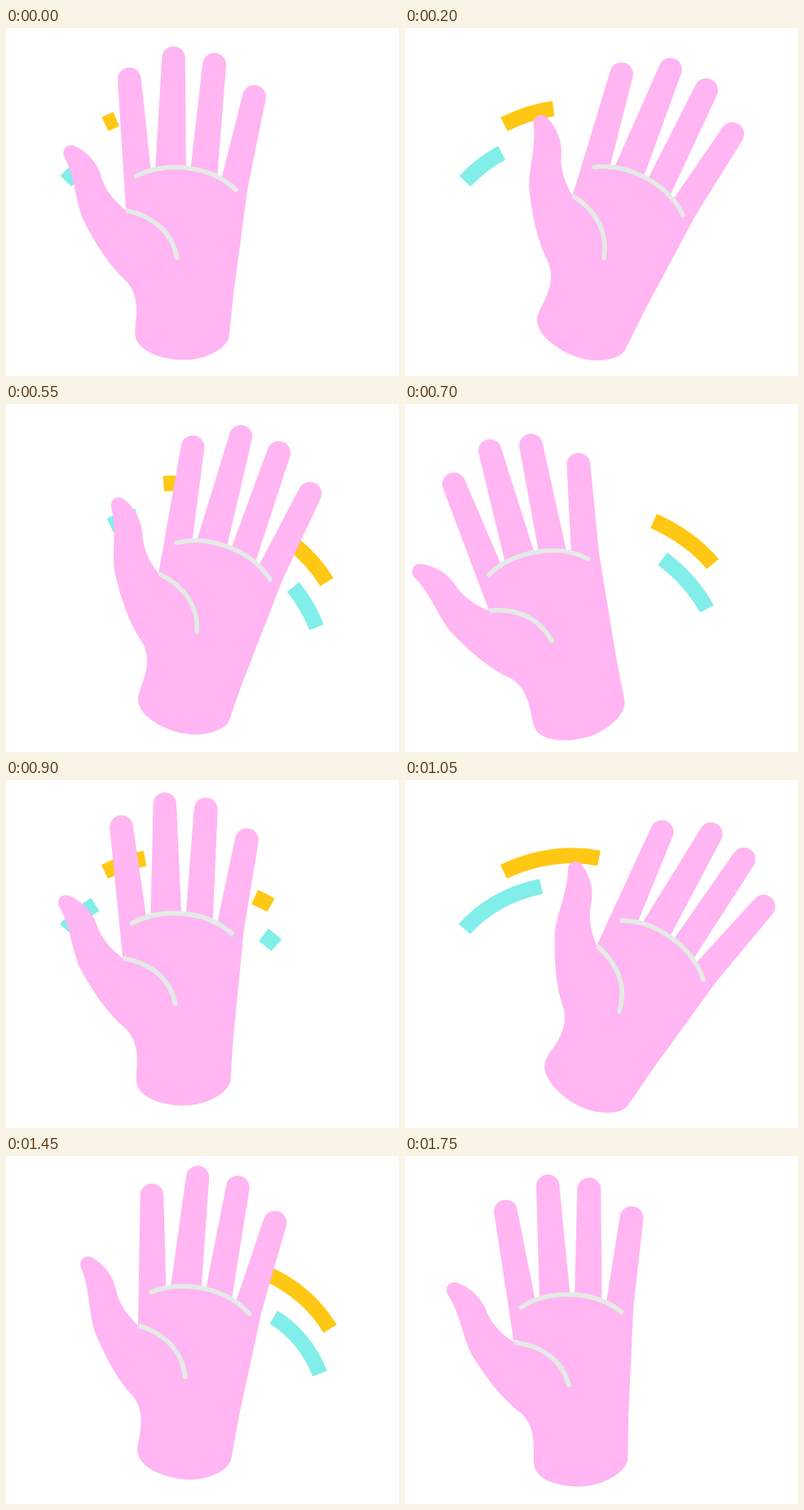
Write an HTML page that moves like this. It is 482 px wide and 427 px high and loops after 1.8 s.

```html
<!DOCTYPE html>
<html lang="en">
<head>
<meta charset="utf-8">
<title>Waving hand</title>
<style>
html, body { margin: 0; width: 100%; height: 100%; overflow: hidden; background: #fff; }
svg { display: block; }
path { fill: none; }
#trails path { stroke-width: 19; }
.crease { stroke: #e4ebe6; stroke-width: 5.6; stroke-linecap: round; }
</style>
</head>
<body>
<svg width="482" height="427" viewBox="0 0 482 427">
  <g id="trails"></g>
  <g id="hand">
    <path style="fill:#ffb6f2" d="M133.5 228.5
      L109.3 70 A14 14 0 0 1 137.7 66 L160.3 180 L165 176
      L161 38 A14 14 0 0 1 189.3 36 L202.5 171 L208 171
      L211.3 41 A14.4 14.4 0 0 1 240.2 41 L241.5 178 L246.8 180
      L263.6 74 A14.2 14.2 0 0 1 292.2 78 L280 187
      L274 320 L273.3 372 C272 386 246 405.5 213 405.5 C183 405.5 158 395 158 376
      C157 360 162 335 143 316 C117 297 97 268 82 244
      C70 220 68 194 52 169 C48 160 56 152 65 156
      C81 162 95 175 101 193 C107 206 117 217.500 133.500 228.500 Z"/>
    <path class="crease" d="M142.500 185.500 C176 164 232 164 265.500 191.500"/>
    <path class="crease" style="stroke-linecap:butt" d="M134 228.500 C170 233 193 252 201 281"/>
    <path class="crease" d="M201 281 l-.3 -1"/>
  </g>
</svg>
<script>
const LOOP = 1800, STEP = 50, PIVOT = '230 384';
const YELLOW = '#ffc814', CYAN = '#82eee9';

// Hand poses: time, angle, shift x, shift y
const poses = [
  [0, 5.1, -.7, 3.1], [200, 25.5, -4.4, 3.6], [400, 38.5, -3, 10],
  [550, 18.7, -1.4, 2.3], [755, -16.5, 0, 1], [900, 3, 1.4, -5.2],
  [1110, 38.5, 0, 4], [1250, 33.1, 0, 0], [1450, 9.6, 1.2, -6.5],
  [1630, -4.3, 0, 0], [1750, 0, 0, 0]
];

// Motion trails: head start and end, tail start and end, then the curves
const sweeps = [
  [-62, 406, 300, 680, 'M121.5 118Q178 90 232 100', 'M73.5 188Q110 149 161 138'],
  [447, 640, 620, 965, 'M393.5 218.5Q364 170 305 143.5', 'M381 274Q360.5 223 316 190'],
  [800, 1030, 1050, 1450, 'M121 112.5Q180 85 238 96', 'M73 183Q108 143 167 130.5'],
  [1160, 1480, 1500, 1740, 'M397.5 212Q368 163 310 140', 'M385 267Q365 217 320 193']
];

const hand = document.getElementById('hand');
const group = document.getElementById('trails');

function addTrail(d, color) {
  const path = document.createElementNS('http://www.w3.org/2000/svg', 'path');
  path.setAttribute('d', d);
  path.setAttribute('pathLength', 1);
  path.setAttribute('stroke', color);
  return group.appendChild(path);
}

const trails = sweeps.map(([a, b, c, d, yellow, cyan]) => ({
  head: [a, b], tail: [c, d],
  paths: [addTrail(yellow, YELLOW), addTrail(cyan, CYAN)]
}));

function key(i) {
  const n = poses.length, turn = Math.floor(i / n);
  const [t, ...values] = poses[i - turn * n];
  return { t: t + turn * LOOP, values };
}

// Slope at a key, flat where the motion turns back
function slope(i, k) {
  const [a, b, c] = [key(i - 1), key(i), key(i + 1)];
  const before = b.values[k] - a.values[k], after = c.values[k] - b.values[k];
  return before * after <= 0 ? 0 : (before + after) / (c.t - a.t);
}

function poseAt(t) {
  const i = poses.findLastIndex(p => p[0] <= t);
  const a = key(i), b = key(i + 1), span = b.t - a.t, u = (t - a.t) / span;
  return a.values.map((v, k) =>
    v + (b.values[k] - v) * u * u * (3 - 2 * u)
    + span * u * (1 - u) * ((1 - u) * slope(i, k) - u * slope(i + 1, k)));
}

const progress = (t, [from, to]) => Math.min(1, Math.max(0, (t - from) / (to - from)));

function draw(t) {
  const [angle, x, y] = poseAt(t);
  hand.setAttribute('transform', `translate(${x} ${y}) rotate(${angle} ${PIVOT})`);
  for (const { head, tail, paths } of trails) {
    const end = progress(t, head), start = progress(t, tail);
    for (const path of paths) {
      path.style.display = end > start ? '' : 'none';
      path.setAttribute('stroke-dasharray', `${end - start} 2`);
      path.setAttribute('stroke-dashoffset', -start);
    }
  }
}

const began = performance.now();
function tick() {
  const t = (performance.now() - began) % LOOP;
  draw(Math.floor(t / STEP) * STEP);
  requestAnimationFrame(tick);
}
tick();
</script>
</body>
</html>
```
